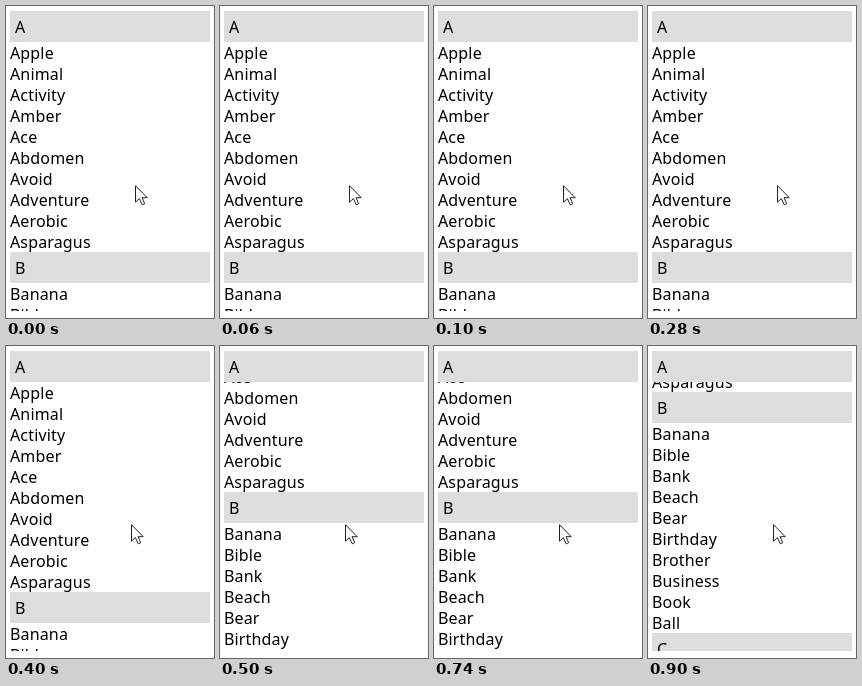
Recreate the animation shown at these times as an HTML page. Size 208 px wide and 312 px high, loop 1000 ms.

```html
<!DOCTYPE html>
<html lang="en">
<head>
<meta charset="utf-8">
<title>Sticky headings</title>
<style>
html, body { margin: 0; width: 100%; height: 100%; overflow: hidden; background: #fefefe; }
#list {
  position: absolute; left: 4px; top: 5px; width: 200px; height: 300px; overflow: hidden;
  font: 16px/23px "Noto Sans", "Open Sans", sans-serif; letter-spacing: .15px; color: #000;
}
h2, p { margin: 0; height: 21px; font: inherit; }
h2 { position: sticky; top: 0; padding: 5px; background: #ddd; }
#cursor { position: absolute; left: 0; top: 0; }
</style>
</head>
<body>
<div id="list"></div>
<svg id="cursor" width="14" height="22" viewBox="0 0 14 22">
  <path d="M.5 .7V17.2L4.4 13.6L7.2 19.8L9.7 18.8L7.1 12.7H12.2Z" fill="#fff" stroke="#222" stroke-linejoin="round"/>
</svg>
<script>
const groups = {
  A: "Apple Animal Activity Amber Ace Abdomen Avoid Adventure Aerobic Asparagus",
  B: "Banana Bible Bank Beach Bear Birthday Brother Business Book Ball",
  C: ""
};
const list = document.getElementById("list");
const cursor = document.getElementById("cursor");

list.innerHTML = Object.entries(groups).map(([letter, words]) =>
  `<section><h2>${letter}</h2>${words.split(" ").map(w => `<p>${w}</p>`).join("")}</section>`
).join("");

// The wheel scrolls in whole notches of 100px.
function draw(now) {
  const t = now % 1000;
  list.scrollTop = t < 500 ? 0 : t < 900 ? 100 : 200;
  cursor.style.transform = t < 400 ? "translate(129px, 179px)" : "translate(125px, 178px)";
}

const start = performance.now();
function tick() {
  draw(performance.now() - start);
  requestAnimationFrame(tick);
}
tick();
</script>
</body>
</html>
```
